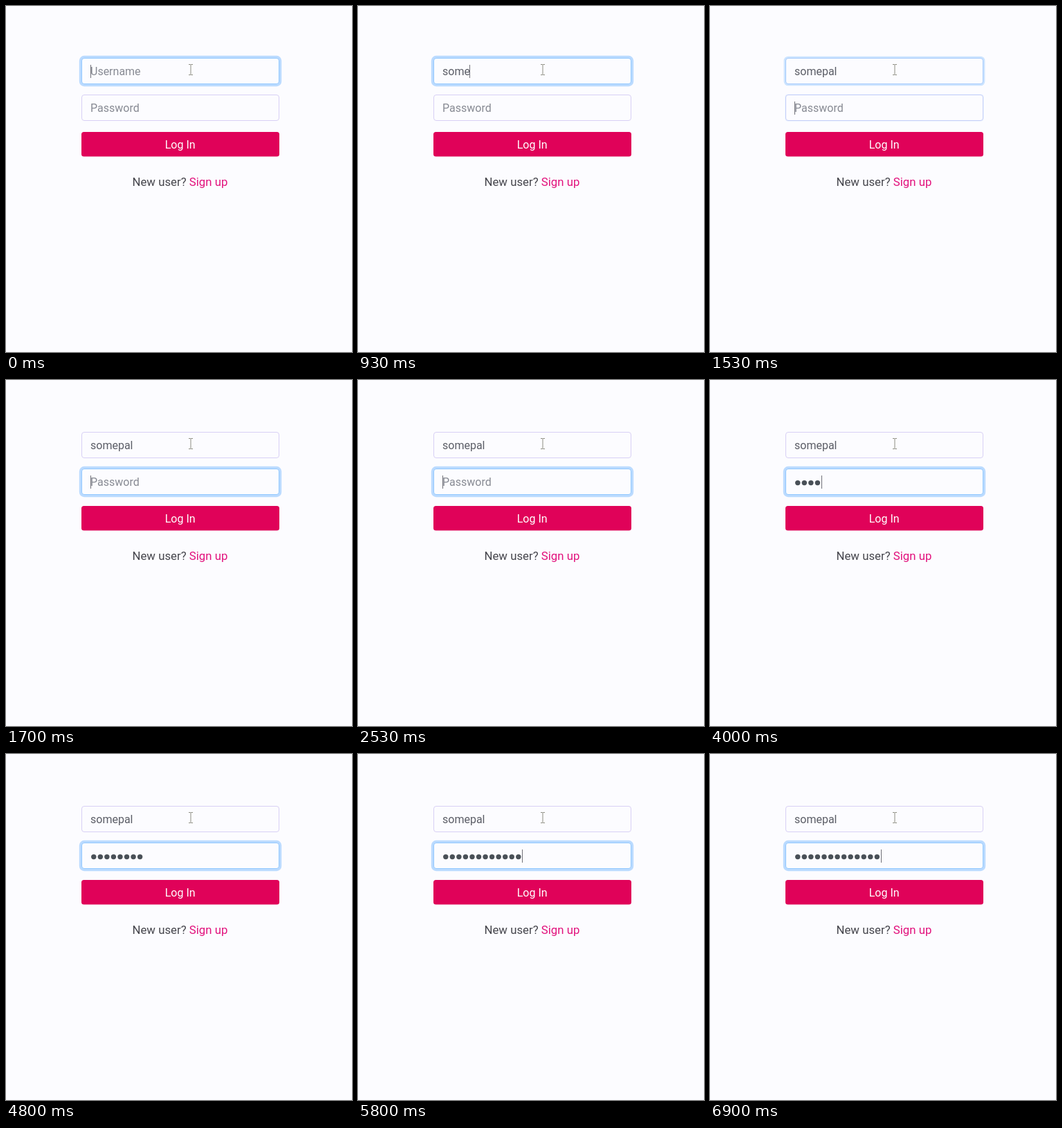
These frames come from a looping animation (500x500 px, 6.93 s). An HTML page:

```html
<!DOCTYPE html>
<html lang="en">
<head>
<meta charset="utf-8">
<title>Log in form</title>
<style>
  html, body { margin: 0; width: 100%; height: 100%; overflow: hidden; background: #fcfcff; }
  svg { display: block; width: 500px; height: 500px; }
  text { font: 16px Roboto, sans-serif; fill: #5b5d66; white-space: pre; }
  .ring { fill: #007bff; }
  .box { fill: #fcfcff; }
  .hint { fill: #878a93; }
  .caret { fill: #707078; }
  .dots { fill: #495057; }
  .button { fill: #e00259; }
  .label { fill: #fff; text-anchor: middle; }
  .foot { font-size: 16.8px; fill: #45454c; }
  .link { fill: #e2127d; }
  .pointer { fill: none; stroke: #8d8d82; }
</style>
</head>
<body>
<svg viewBox="0 0 500 500">
  <g id="user">
    <rect class="ring"/>
    <rect class="box" x="109.5" y="75.5" width="285" height="37" rx="3.5"/>
    <text class="hint" x="122" y="100">Username</text>
    <text class="value" x="122" y="100"></text>
    <rect class="caret" y="85" width="1" height="19"/>
  </g>
  <g id="pass">
    <rect class="ring"/>
    <rect class="box" x="109.5" y="128.5" width="285" height="37" rx="3.5"/>
    <text class="hint" x="122" y="153">Password</text>
    <g class="dots"></g>
    <rect class="caret" y="138" width="1" height="19"/>
  </g>
  <rect class="button" x="109" y="182" width="286" height="35.5" rx="3.5"/>
  <text class="label" x="251.7" y="206">Log In</text>
  <text class="foot" x="182.5" y="260">New user? <tspan class="link">Sign up</tspan></text>
  <path class="pointer" d="M264 84.5h2.5l.5 .5l.5-.5h2.5M267 85v14M264 99.5h2.5l.5-.5l.5 .5h2.5"/>
</svg>
<script>
const LOOP = 6930, LEFT = 122, STEP = 9.55;
const NAME = "somepal";
const nameKeys = [100, 330, 560, 780, 1030, 1200, 1370];
const passKeys = [3500, 3650, 3800, 3950, 4130, 4390, 4530, 4660, 5130, 5330, 5530, 5730, 6190];
const SWITCH = 1480, FADE = 150;
const hidden = [[2030, 2530], [3100, 3500], [4780, 5130], [6420, 6850]];

function field(id, top) {
  const find = cls => document.querySelector(`#${id} .${cls}`);
  return { top, ring: find("ring"), box: find("box"), hint: find("hint"), caret: find("caret") };
}

const user = field("user", 75), pass = field("pass", 128);
const value = document.querySelector("#user .value");
const holder = document.querySelector("#pass .dots");
const dots = passKeys.map((_, i) => {
  const dot = document.createElementNS("http://www.w3.org/2000/svg", "circle");
  set(dot, { cx: LEFT + STEP * (i + 0.5), cy: 148.6, r: 3.7 });
  holder.append(dot);
  return dot;
});

function set(el, attrs) {
  for (const key in attrs) el.setAttribute(key, attrs[key]);
}

const show = (el, on) => set(el, { visibility: on ? "visible" : "hidden" });
const typed = (keys, t) => keys.filter(k => k <= t).length;
const ease = p => p * p * (3 - 2 * p);
const mix = (a, b, p) => a.map((v, i) => Math.round(v + (b[i] - v) * p));

function drawFocus(f, p) {
  const w = 3.2 * p;
  set(f.ring, {
    x: 109 - w, y: f.top - w, width: 286 + 2 * w, height: 38 + 2 * w,
    rx: 4 + w, "fill-opacity": 0.26 * p
  });
  set(f.box, { stroke: `rgb(${mix([216, 208, 245], [146, 200, 255], p)})` });
}

function draw(t) {
  const focus = ease(Math.min(1, Math.max(0, (t - SWITCH) / FADE)));
  drawFocus(user, 1 - focus);
  drawFocus(pass, focus);

  const letters = typed(nameKeys, t), count = typed(passKeys, t);
  value.textContent = NAME.slice(0, letters);
  show(user.hint, !letters);
  show(pass.hint, !count);
  dots.forEach((dot, i) => show(dot, i < count));

  const width = letters ? value.getComputedTextLength() : 0;
  set(user.caret, { x: Math.floor(LEFT + width) });
  set(pass.caret, { x: Math.round(LEFT + STEP * count + 0.4) });
  show(user.caret, t < SWITCH);
  show(pass.caret, t >= SWITCH && !hidden.some(([a, b]) => t >= a && t < b));
}

function tick() {
  draw(performance.now() % LOOP);
  requestAnimationFrame(tick);
}
tick();
</script>
</body>
</html>
```
